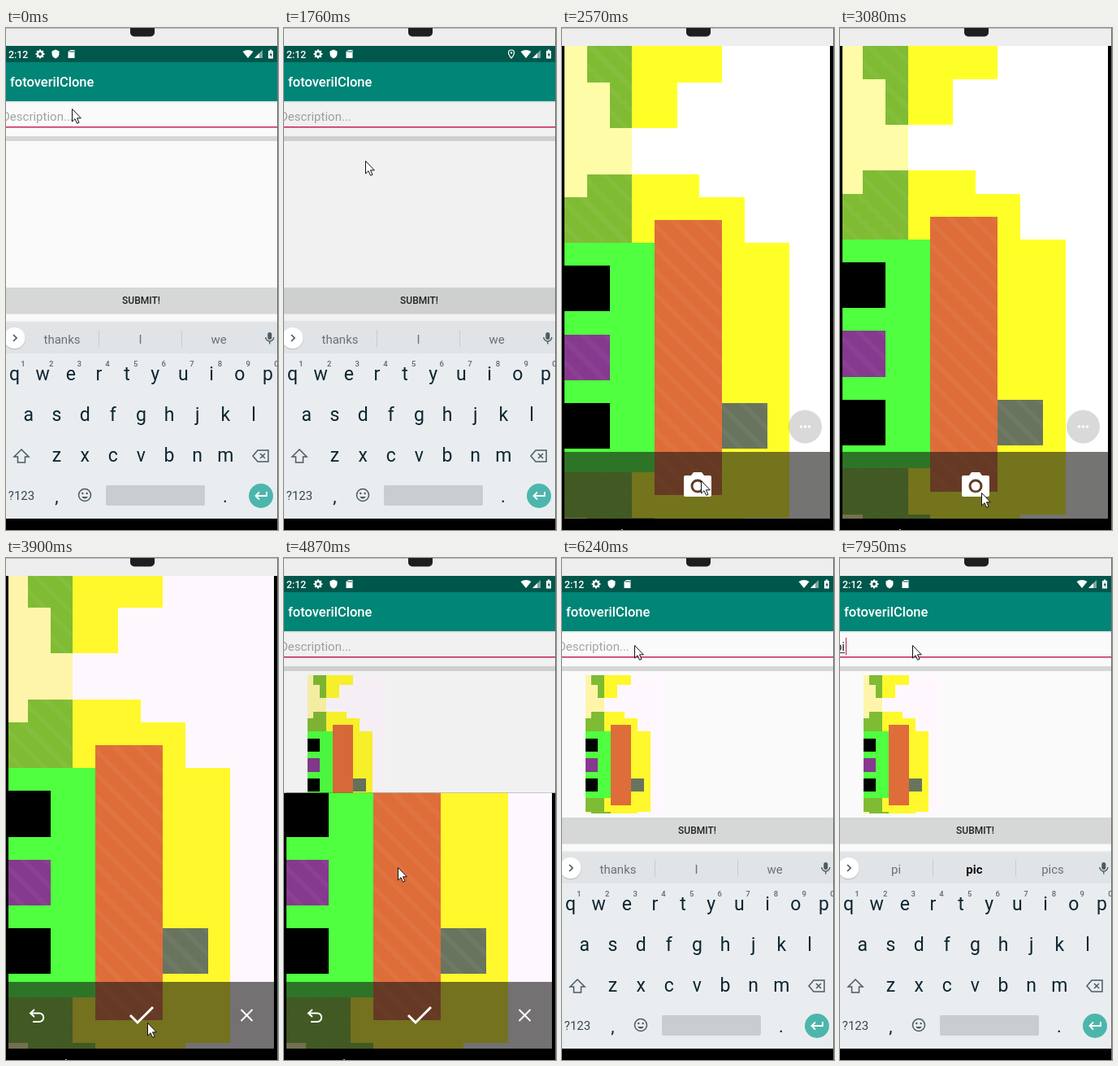
Recreate the animation shown at these times as an HTML page with a canvas. Size 335x617 px, loop 8000 ms.

```html
<!DOCTYPE html>
<html lang="en">
<head>
<meta charset="utf-8">
<title>Photo post</title>
<style>
html, body { margin: 0; width: 100%; height: 100%; overflow: hidden; background: #000; }
canvas { display: block; }
</style>
</head>
<body>
<canvas id="stage" width="335" height="617"></canvas>
<script>
const c = document.getElementById('stage').getContext('2d');
const LOOP = 8000, PRESS = 1250, LEAVE = 1520, CAMERA = 1800, SHUTTER = 3380, ACCEPT = 4650,
  RETURNED = 5270, KEYBOARD = 5600, FIRST_KEY = 7520, SECOND_KEY = 7950;

// Key points: time, x, y
const POINTER = [[0, 81, 99], [720, 75, 139], [LEAVE, 75, 139], [2030, 129, 191], [2570, 171, 556],
  [2900, 174, 571], [4000, 174, 571], [ACCEPT, 169, 562], [5140, 102, 135], [5420, 94, 92], [6090, 89, 107]];
const VIEW = [[2030, 24, 68], [2570, 31, 67], [SHUTTER, 27, 61]];

const LIVE = { white: '#ffffff', cream: '#fffca8', yellow: '#ffff28', olive: '#80bb34', lime: '#50ff40',
  orange: '#de6d39', black: '#000000', purple: '#86398e', slate: '#69745f' };
const SHOT = { ...LIVE, white: '#fef8fe', cream: '#fef5aa', yellow: '#fff82c' };

const progress = (t, from, to) => Math.min(1, Math.max(0, (t - from) / (to - from)));
const easeOut = p => 1 - (1 - p) ** 3;
const smooth = p => p * p * (3 - 2 * p);

function follow(keys, t) {
  const next = keys.findIndex(k => k[0] > t);
  if (next < 0) return keys.at(-1).slice(1);
  const b = keys[next], a = keys[next - 1] || b;
  const p = smooth(progress(t, a[0], b[0]));
  return [a[1] + (b[1] - a[1]) * p, a[2] + (b[2] - a[2]) * p];
}

function rect(color, x, y, w, h) {
  c.fillStyle = color;
  c.fillRect(x, y, w, h);
}
function disc(color, x, y, r) {
  c.fillStyle = color;
  c.beginPath();
  c.arc(x, y, r, 0, 7);
  c.fill();
}
function ring(color, x, y, r, width) {
  c.strokeStyle = color;
  c.lineWidth = width;
  c.beginPath();
  c.arc(x, y, r, 0, 7);
  c.stroke();
}
function round(color, x, y, w, h, r) {
  c.fillStyle = color;
  c.beginPath();
  c.roundRect(x, y, w, h, r);
  c.fill();
}
function text(s, x, y, size, color, align = 'center', weight = 400) {
  c.font = `${weight} ${size}px Roboto, sans-serif`;
  c.textAlign = align;
  c.fillStyle = color;
  c.fillText(s, x, y);
}
function path(d, x, y, { fill, stroke, width = 1.5 }) {
  const shape = new Path2D(d);
  c.save();
  c.translate(x, y);
  if (fill) { c.fillStyle = fill; c.fill(shape); }
  if (stroke) { c.strokeStyle = stroke; c.lineWidth = width; c.stroke(shape); }
  c.restore();
}
function clipped(x, y, w, h, draw) {
  c.save();
  c.beginPath();
  c.rect(x, y, w, h);
  c.clip();
  draw();
  c.restore();
}

// Right end of the yellow shape in a row
function yellowEnd(row) {
  if (row < 0) return 6;
  if (row < 2) return 4;
  if (row < 4) return 2;
  if (row < 5) return 5;
  return row < 7 || row > 18 ? 7 : 9;
}
function blockColor(col, row) {
  const middle = row > 6 && row < 17;
  if (col > 2 && col < 6 && row > 5 && row < 18) return 'orange';
  if ((col === 6 || col === 7) && (row === 14 || row === 15)) return 'slate';
  if (middle && col < 1 && row % 3 !== 1) return row === 11 || row === 12 ? 'purple' : 'black';
  if (middle && col < 3) return 'lime';
  if (row > 18 && col < 3) return col < 0 ? 'cream' : 'olive';
  if (col < 2) {
    const trunk = row >= 5 ? -3 : row >= 4 ? 0 : row >= 2 ? 2 : row >= 0 ? 1 : 0;
    return col < trunk ? 'cream' : 'olive';
  }
  return col < yellowEnd(row) ? 'yellow' : 'white';
}

function scene(x, y, cw, ch, colors, hatched) {
  const textured = new Path2D();
  for (let row = -3; row < 22; row++) {
    for (let col = -3; col < 13; col++) {
      const name = blockColor(col, row);
      const left = Math.round(x + col * cw), top = Math.round(y + row * ch);
      const box = [left, top, Math.round(x + (col + 1) * cw) - left, Math.round(y + (row + 1) * ch) - top];
      rect(colors[name], ...box);
      if (['olive', 'orange', 'purple', 'slate'].includes(name)) textured.rect(...box);
    }
  }
  if (!hatched) return;
  c.save();
  c.clip(textured);
  c.strokeStyle = 'rgba(255,255,255,.04)';
  c.lineWidth = 6;
  c.beginPath();
  for (let s = -600; s < 335; s += 28) {
    c.moveTo(x + s, y - 60);
    c.lineTo(x + s + 660, y + 600);
  }
  c.stroke();
  c.restore();
}

function statusBar(located) {
  rect('#00574b', 0, 22, 335, 20);
  text('2:12', 3, 37, 12.3, '#fff', 'left', 500);
  ring('#fff', 42, 32, 3.2, 2.4);
  for (let i = 0; i < 8; i++) {
    const a = i * Math.PI / 4;
    disc('#fff', 42 + 4.6 * Math.cos(a), 32 + 4.6 * Math.sin(a), 1.1);
  }
  path('M0-5.5 4.5-3.5V0Q4 4 0 5.5Q-4 4-4.5 0V-3.5Z', 61, 32, { fill: '#fff' });
  path('M-1.5-5H4V5H-4V-2.5Z', 80.5, 32, { fill: '#fff' });
  path('M-1.5-4V-2M.5-4V-2M2.5-4V-2', 80.5, 32, { stroke: '#00574b', width: 1 });
  if (located) {
    path('M0 5Q-3.5 1-3.5-1.5A3.5 3.5 0 0 1 3.5-1.5Q3.5 1 0 5Z', 280, 32, { stroke: '#fff', width: 1.2 });
    disc('#fff', 280, 30.5, 1.2);
  }
  path('M0 5-6.5-3Q0-7 6.5-3Z', 298, 32, { fill: '#fff' });
  path('M-5 5H5V-5Z', 311, 32, { fill: '#7fa9a3' });
  path('M-5 5H1V-1Z', 311, 32, { fill: '#fff' });
  path('M-3-4H-1.2V-5.5H1.2V-4H3V5.5H-3Z', 326, 32, { fill: '#fff' });
  path('M.5-2.5-1.5 1.5H0V4L1.8 0H.5Z', 326, 32, { fill: '#00574b' });
}

function form(t) {
  const pressed = t >= PRESS && t < LEAVE;
  rect('#fafafa', 0, 90, 335, 513);
  rect('rgba(0,0,0,.06)', 0, 90, 335, 2);
  if (t < FIRST_KEY) text('Description...', -5, 114, 15, '#a3a3a3', 'left');
  else {
    const typed = t < SECOND_KEY ? 'p' : 'pi', caret = typed.length * 4 - 1;
    text(typed, caret - 1, 114, 15, '#222', 'right');
    rect('#333', 0, 116, caret - 1, 1);
    rect('#b2214f', caret, 98, 1, 21);
  }
  rect('#c92c60', 0, 121, 335, 1);
  rect('#e0809f', 0, 122, 335, 1);
  rect(pressed ? '#c6c7c7' : '#d6d7d7', 0, 133, 335, 6);
  if (t >= ACCEPT) clipped(29, 144, 95, 170, () => scene(36, 156, 8.1, 8.2, SHOT, false));
  rect('#d6d7d7', 0, 319, 335, 32);
  rect('rgba(0,0,0,.08)', 0, 351, 335, 1);
  text('SUBMIT!', 166.5, 339, 12, '#222', 'center', 500);
  const dim = t < RETURNED ? .036 * progress(t, LEAVE, 1760) : 0;
  rect(`rgba(0,0,0,${dim})`, 0, 90, 335, 513);
  rect('#008577', 0, 41, 335, 49);
  text('fotoverilClone', 5, 72, 16.5, '#fff', 'left', 500);
  statusBar(t >= LEAVE && t < ACCEPT);
}

function keyboard(t) {
  const ink = '#0d2630', soft = '#4c5a62';
  rect('rgba(0,0,0,.06)', 0, 360, 335, 2);
  rect('#e9edf0', 0, 362, 335, 241);
  rect('#e0e4e7', 0, 362, 335, 38);
  disc('rgba(0,0,0,.12)', 10.5, 382, 13.5);
  disc('#fff', 10.5, 381, 13);
  path('M-2-4 2 0-2 4', 11, 381, { stroke: soft, width: 1.7 });
  const words = t < FIRST_KEY ? 'thanks I we' : t < SECOND_KEY ? 'p pm po' : 'pi pic pics';
  words.split(' ').forEach((word, i) => {
    const chosen = i === 1 && t >= SECOND_KEY;
    text(word, 69 + i * 96.5, 388, 15, chosen ? '#111' : '#6b7175', 'center', chosen ? 700 : 400);
  });
  rect('#c8ccd0', 114, 371, 1, 21);
  rect('#c8ccd0', 216, 371, 1, 21);
  round(soft, 322.3, 374, 5, 9, 2.5);
  path('M-5-1A5 5 0 0 0 5-1M0 4V7.5', 324.8, 381, { stroke: soft, width: 1.4 });

  const pitch = 34.65;
  ['qwertyuiop', 'asdfghjkl', 'zxcvbnm'].forEach((keys, row) => {
    const x = 10.5 + pitch * row * (row + 1) / 4;
    [...keys].forEach((key, i) => text(key, x + i * pitch, 433 + row * 50, 23, ink));
  });
  [...'1234567890'].forEach((n, i) => text(n, 21 + i * pitch, 416, 9.5, '#5d686e', 'center', 500));

  path('M0-8 9 1H4.5V8H-4.5V1H-9Z', 19, 526, { stroke: soft });
  path('M-10 0-4-7H9V7H-4ZM-1-3 5 3M5-3-1 3', 314, 526, { stroke: soft });
  text('?123', 19, 580, 15, '#37474f');
  text(',', 62.5, 583, 22, ink);
  text('.', 270, 583, 22, ink);
  ring(soft, 97, 574, 7.5, 1.5);
  disc(soft, 94.3, 572, 1.2);
  disc(soft, 99.7, 572, 1.2);
  path('M-4 2Q0 7 4 2Z', 97, 574, { fill: soft });
  round('#c9cdd0', 123, 562, 122, 25, 2);
  disc('#4db6ac', 314, 575, 15);
  path('M7-5V0H-6M-2-4.5-6.5 0-2 4.5', 314, 575, { stroke: '#fff', width: 1.8 });
}

function cameraIcon(x, y, scale, color) {
  c.save();
  c.translate(x, y);
  c.scale(scale, scale);
  c.fillStyle = color;
  const body = new Path2D('M-15-11H-8L-5-15H5L8-11H15Q17-11 17-9V13Q17 15 15 15H-15Q-17 15-17 13V-9Q-17-11-15-11Z');
  body.arc(0, 2, 8.5, 0, Math.PI * 2);
  c.fill(body, 'evenodd');
  disc(color, 0, 2, 5.5);
  c.restore();
}

function camera(t) {
  const shot = t >= SHUTTER + 120;
  const dim = .467 * (1 - progress(t, 1880, 2300));
  rect('#000', 0, 22, 335, 595);
  clipped(3, 22, 327, 581, () => {
    scene(...follow(VIEW, t), 27.7, 28.15, shot ? SHOT : LIVE, true);
    cameraIcon(166.5, 310.5, 1.3, `rgba(255,180,140,${dim})`);
    ring(`rgba(60,20,0,${dim / 6})`, 166.5, 312, 42, 1);
    rect('rgba(24,24,22,.6)', 3, 521, 327, 82);
    if (shot) {
      path('M-14 0-5 9 14-10', 167, 562, { stroke: '#fff', width: 3 });
      path('M-7-7 7 7M7-7-7 7', 296.5, 562, { stroke: '#fff', width: 2 });
      path('M-3-8-8-3.5-3 1M-8-3.5H3A5.2 5.2 0 0 1 3 7H-5', 38, 563, { stroke: '#fff', width: 2 });
    } else {
      cameraIcon(167, 561, 1, '#fff');
      disc('rgba(0,0,0,.15)', 299.5, 490, 20.5);
      for (const dx of [-5, 0, 5]) disc('#fff', 299.5 + dx, 490, 1.7);
    }
    rect(`rgba(0,0,0,${dim})`, 3, 22, 327, 581);
  });
}

function bezel(keyboardShown) {
  rect('#000', 0, 603, 335, 14);
  if (!keyboardShown) rect('#aaa', 73, 616, 2, 1);
  rect('#eeeeee', 0, 0, 335, 22);
  rect('#9a9a9a', 0, 0, 335, .6);
  round('#1e1e20', 153, -6, 30, 16.5, 5);
  rect('#6c6f70', 334, 0, 1, 617);
}

function pointer(x, y) {
  path('M.5.5V16L4 12.7 6.6 18.3 9 17.2 6.5 11.8H11.3Z', Math.round(x), Math.round(y),
    { fill: '#fff', stroke: '#111', width: 1 });
}

function draw(t) {
  const opened = easeOut(progress(t, CAMERA, 2080));
  const closed = progress(t, ACCEPT, 4980) ** 2;
  const keyboardShown = t < CAMERA || t >= KEYBOARD;

  c.save();
  c.translate(0, closed ? 0 : -12 * opened);
  form(t);
  if (keyboardShown) {
    if (t >= KEYBOARD) c.translate(0, 250 * (1 - easeOut(progress(t, KEYBOARD, 6090))));
    keyboard(t);
  }
  c.restore();

  if (opened && closed < 1) {
    const top = 22 + 595 * (1 - opened + closed);
    clipped(0, top, 335, 617 - top, () => camera(t));
  }
  bezel(keyboardShown);
  pointer(...follow(POINTER, t));
}

const start = performance.now();
function tick() {
  draw((performance.now() - start) % LOOP);
  requestAnimationFrame(tick);
}
tick();
</script>
</body>
</html>
```
